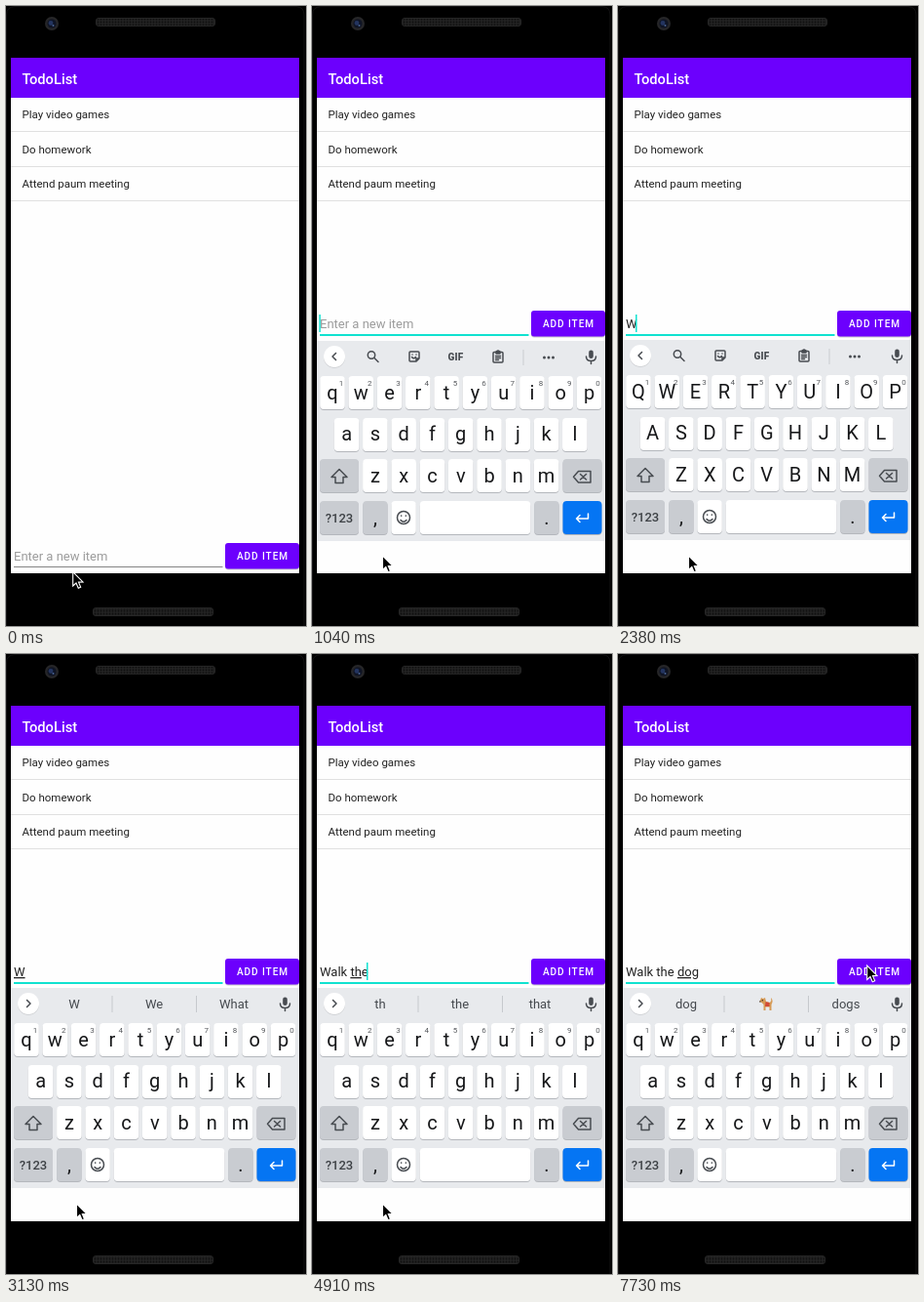
Write an HTML page that moves like this. It is 308x635 px and loops after 8000 ms.

```html
<!DOCTYPE html>
<html lang="en">
<head>
<meta charset="utf-8">
<title>To-do list</title>
<style>
  html, body { margin: 0; width: 100%; height: 100%; overflow: hidden; background: #000; }
  svg { display: block; }
  text { font-family: Roboto, sans-serif; white-space: pre; }
  .middle { text-anchor: middle; }
  .item { font-size: 11.5px; fill: #222; }
  .entry { font-size: 13px; fill: #222; }
  .entry .composing { text-decoration: underline; }
  .letter { font-size: 20px; fill: #17181a; }
  .digit { font-size: 8px; fill: #55585c; }
  .word { font-size: 13px; fill: #45494e; }
  .purple { fill: #6c00fd; }
  .icon { fill: none; stroke: #484c51; stroke-width: 1.5; stroke-linecap: round; stroke-linejoin: round; }
  .solid { fill: #484c51; stroke: none; }
</style>
</head>
<body>
<svg width="308" height="635" viewBox="0 0 308 635">
  <defs>
    <pattern id="mesh" width="3" height="3" patternUnits="userSpaceOnUse">
      <rect width="3" height="3" fill="#222"/><circle cx="1.5" cy="1.5" r=".9" fill="#0f0f0f"/>
    </pattern>
    <clipPath id="screen"><rect x="5" y="53" width="296" height="528"/></clipPath>
  </defs>

  <!-- Phone body -->
  <rect width="308" height="635"/>
  <path d="M.5 635V9Q.5 1 9 .5H298Q306 1 306 9V635" fill="none" stroke="#121113"/>
  <circle cx="47" cy="18" r="7" fill="#262628"/>
  <circle cx="47" cy="18" r="4.6" fill="#0f1424"/>
  <circle cx="46" cy="17.5" r="2.4" fill="#23345f"/>
  <circle cx="48.5" cy="20" r="1" fill="#496394"/>
  <g fill="url(#mesh)" stroke="#262626">
    <rect x="92.500" y="12.500" width="122" height="8" rx="2.500"/>
    <rect x="89.500" y="616.500" width="123" height="8" rx="2.500"/>
  </g>

  <g clip-path="url(#screen)">
    <rect x="5" y="53" width="296" height="528" fill="#fefefe"/>
    <rect x="5" y="53" width="296" height="41" class="purple"/>
    <text x="16.500" y="80" font-size="14.700" font-weight="500" fill="#fff">TodoList</text>
    <g id="list"></g>

    <g id="keyboard">
      <rect x="5" y="342" width="296" height="205" fill="#e8eaed"/>
      <circle cx="23" cy="358.800" r="11" fill="#c9cbce"/>
      <circle cx="23" cy="358" r="11" fill="#fff"/>
      <path id="chevron" class="icon"/>
      <g id="tools">
        <g class="icon">
          <circle cx="61" cy="356.500" r="3.700"/><path d="M64 359.500L68 363.500"/>
          <path d="M101 353H109Q110 353 110 354V360L107 363H101Q100 363 100 362V354Q100 353 101 353M110 360H107V363M102.500 358.500Q104.500 361 106.500 358.500M103 356V356.100M107 356V356.100"/>
          <path d="M187 353.500H195Q196 353.500 196 354.500V363Q196 364 195 364H187Q186 364 186 363V354.500Q186 353.500 187 353.500M189 353V355H193V353L191 352ZM188.500 357.500H193.500M188.500 359.500H193.500M188.500 361.500H191.500"/>
        </g>
        <text x="147.500" y="362" class="middle" font-size="10" font-weight="800" letter-spacing=".3" fill="#484c51">GIF</text>
        <path d="M217 351V367" stroke="#c9ccd0"/>
        <g class="solid"><circle cx="238.500" cy="359" r="1.500"/><circle cx="243" cy="359" r="1.500"/><circle cx="247.500" cy="359" r="1.500"/></g>
      </g>
      <g id="suggestions">
        <path d="M109 350V367M195.500 350V367" stroke="#c6c9cd"/>
        <text class="word middle" x="70" y="363"></text>
        <text class="word middle" x="152" y="363"></text>
        <text class="word middle" x="234" y="363"></text>
        <g id="dog">
          <path d="M147 352L149 353L151 352L152 356L156 357Q158 355 157 352Q160 355 157.500 359V365H155.500V361.500H151.500V365H149.500V359L147.500 357L145.500 356Z" fill="#d69a55"/>
          <path d="M151.500 356.300L155.500 357V361H151Z" fill="#d24a36"/>
          <circle cx="148.300" cy="354.700" r=".7" fill="#3a2a20"/><circle cx="145.900" cy="356" r=".7" fill="#3a2a20"/>
        </g>
      </g>
      <rect x="284.200" y="351.500" width="4.600" height="8.500" rx="2.300" class="solid"/>
      <path d="M281.500 358Q281.500 362.500 286.500 362.500T291.500 358M286.500 362.500V365.500" class="icon"/>
      <g id="keys"></g>
      <g class="icon">
        <path d="M28 473.500L36 481.500H32V487.500H24V481.500H20Z"/>
        <path d="M273.500 475.500H286V487H273.500L268.500 481.250ZM275.500 478.500L281.500 484M281.500 478.500L275.500 484"/>
        <circle cx="94" cy="523" r="6.500"/>
        <path d="M91 525.500Q94 529 97 525.500M91.700 521V521.200M96.300 521V521.200"/>
        <path d="M283.500 519V524H271.500M275 520.500L271.500 524L275 527.500" stroke="#fff"/>
      </g>
      <text x="28" y="528" class="middle" font-size="13" font-weight="500" fill="#3d4145">?123</text>
      <text x="65" y="530" class="letter middle">,</text>
      <text x="241" y="530" class="letter middle">.</text>
    </g>

    <g id="entryRow">
      <rect x="225" y="313.500" width="76" height="26" rx="3" fill="#000" opacity=".2"/>
      <rect x="225" y="312" width="76" height="26.500" rx="3" class="purple"/>
      <text x="263.500" y="329" class="middle" font-size="10.100" font-weight="500" letter-spacing=".9" fill="#fff">ADD ITEM</text>
      <rect id="line" x="8" y="336" width="214.500"/>
      <text id="hint" x="8" y="330" class="entry" style="fill:#9c9c9c">Enter a new item</text>
      <text id="typed" x="8" y="330" class="entry"><tspan></tspan><tspan class="composing"></tspan><tspan></tspan></text>
      <rect id="caret" y="316" width="1.500" height="18"/>
    </g>
  </g>

  <path id="pointer" d="M0 0V14.500L3.300 11.500L5.600 16.800L8 15.700L5.800 10.600L10.300 10.400Z" fill="#000" stroke="#fff" stroke-width="1.100"/>
</svg>

<script>
const $ = id => document.getElementById(id);

function add(parent, tag, attrs, text = '') {
  const node = document.createElementNS('http://www.w3.org/2000/svg', tag);
  for (const name in attrs) node.setAttribute(name, attrs[name]);
  node.textContent = text;
  return parent.appendChild(node);
}

// List items
['Play video games', 'Do homework', 'Attend paum meeting'].forEach((item, i) => {
  const y = Math.floor(115.5 + i * 35.5);
  add($('list'), 'text', { class: 'item', x: 16.5, y }, item);
  add($('list'), 'rect', { x: 5, y: y + 13, width: 296, height: 1, fill: '#e0e0e0' });
});

// Keys
const PITCH = 29.28;
const ROW_PITCH = 42.7;
const GRAY = '#c9ccd1';
const TEAL = '#10e2d0';
const rowTop = row => 378 + row * ROW_PITCH;
const letters = [];

function key(x, row, width, fill = '#fff') {
  const y = Math.round(rowTop(row));
  add($('keys'), 'rect', { x, y: y + 1, width, height: 34, rx: 4, fill: '#b4b7bc' });
  add($('keys'), 'rect', { x, y, width, height: 34, rx: 4, fill });
}

[['qwertyuiop', 21], ['asdfghjkl', 35.6], ['zxcvbnm', 64.9]].forEach(([labels, left], row) => {
  const baseline = Math.floor(rowTop(row) + 24);
  [...labels].forEach((letter, i) => {
    const x = left + i * PITCH;
    key(x - 12.8, row, 25.6);
    letters.push(add($('keys'), 'text', { class: 'letter middle', x, y: baseline }, letter));
    if (row === 0) add($('keys'), 'text', { class: 'digit middle', x: x + 9, y: 387.5 }, (i + 1) % 10);
  });
});
key(8, 2, 40, GRAY);
key(257.5, 2, 40, GRAY);
key(8, 3, 40, GRAY);
key(52.2, 3, 25.4, GRAY);
key(81.4, 3, 25.4);
key(110.8, 3, 113.5);
key(228.2, 3, 25.4, GRAY);
key(257.5, 3, 40, '#0575f3');

// Each track lists [start time in ms, value]
const LOOP = 8000;
const typedTrack = [[0, ''], [2380, 'W'], [3280, 'Wa'], [3720, 'Wal'], [3870, 'Walk'], [4320, 'Walk '],
  [4610, 'Walk t'], [4760, 'Walk th'], [4910, 'Walk the'], [5200, 'Walk the '], [5800, 'Walk the d'],
  [6690, 'Walk the do'], [6830, 'Walk the dog']];
const suggestionTrack = [[0, ''], [2680, 'W We What'], [3420, 'Wa Was Want'], [4020, 'Walk Walks Walking'],
  [4470, 'to in the'], [4760, 't to the'], [4910, 'th the that'], [5060, 'the them then'],
  [5350, 'same first best'], [6100, 'd dog day'], [6980, 'dog 🐕 dogs']];
const caretTrack = [[0, 0], [740, 1], [1340, 0], [1780, 1], [2230, 0], [2380, 1], [3130, 0], [3280, 1],
  [6540, 0], [6690, 1], [7430, 0]];
const pointerTrack = [[0, [68.7, 579.5]], [150, [71, 574]], [300, [73, 566]], [450, [72.5, 563]],
  [7280, [86, 540]], [7430, [153, 440]], [7580, [226, 348]], [7730, [255.7, 319]]];

const at = (track, t) => track.findLast(([start]) => start <= t)[1];

function drawEntry(t, words) {
  const typed = at(typedTrack, t);
  const wordStart = typed.lastIndexOf(' ') + 1;
  const composing = words[0] && typed.slice(wordStart).startsWith(words[0]) ? words[0] : '';
  const parts = [typed.slice(0, wordStart), composing, typed.slice(wordStart + composing.length)];
  parts.forEach((part, i) => $('typed').children[i].textContent = part);

  const focused = t >= 740;
  $('hint').style.display = typed ? 'none' : '';
  $('line').setAttribute('height', focused ? 2 : 1);
  $('line').setAttribute('fill', focused ? TEAL : '#858585');
  $('caret').setAttribute('fill', TEAL);
  $('caret').style.display = at(caretTrack, t) ? '' : 'none';
  $('caret').setAttribute('x', typed ? Math.floor(7 + $('typed').getComputedTextLength()) : 7.3);
  $('entryRow').setAttribute('transform', `translate(0 ${t < 1040 ? 238 : 0})`);
}

function drawKeyboard(t, words) {
  const suggesting = words.length > 1;
  const upper = t >= 2230 && t < 2530;
  $('keyboard').style.display = t < 1040 ? 'none' : '';
  $('keyboard').setAttribute('transform', `translate(0 ${t < 1190 ? 1 : 0})`);
  $('chevron').setAttribute('d', suggesting ? 'M21.500 354.500L25 358L21.500 361.500' : 'M24.500 354.500L21 358L24.500 361.500');
  $('tools').style.display = suggesting ? 'none' : '';
  $('suggestions').style.display = suggesting ? '' : 'none';
  $('dog').style.display = words[1] === '🐕' ? '' : 'none';
  document.querySelectorAll('.word').forEach((node, i) => {
    node.textContent = words[i] === '🐕' ? '' : words[i] || '';
  });
  for (const node of letters) {
    node.textContent = upper ? node.textContent.toUpperCase() : node.textContent.toLowerCase();
  }
}

let startTime;
function frame(now) {
  startTime ??= now;
  const t = (now - startTime) % LOOP;
  const words = at(suggestionTrack, t).split(' ');
  drawEntry(t, words);
  drawKeyboard(t, words);
  $('pointer').setAttribute('transform', `translate(${at(pointerTrack, t)})`);
  requestAnimationFrame(frame);
}
requestAnimationFrame(frame);
</script>
</body>
</html>
```
